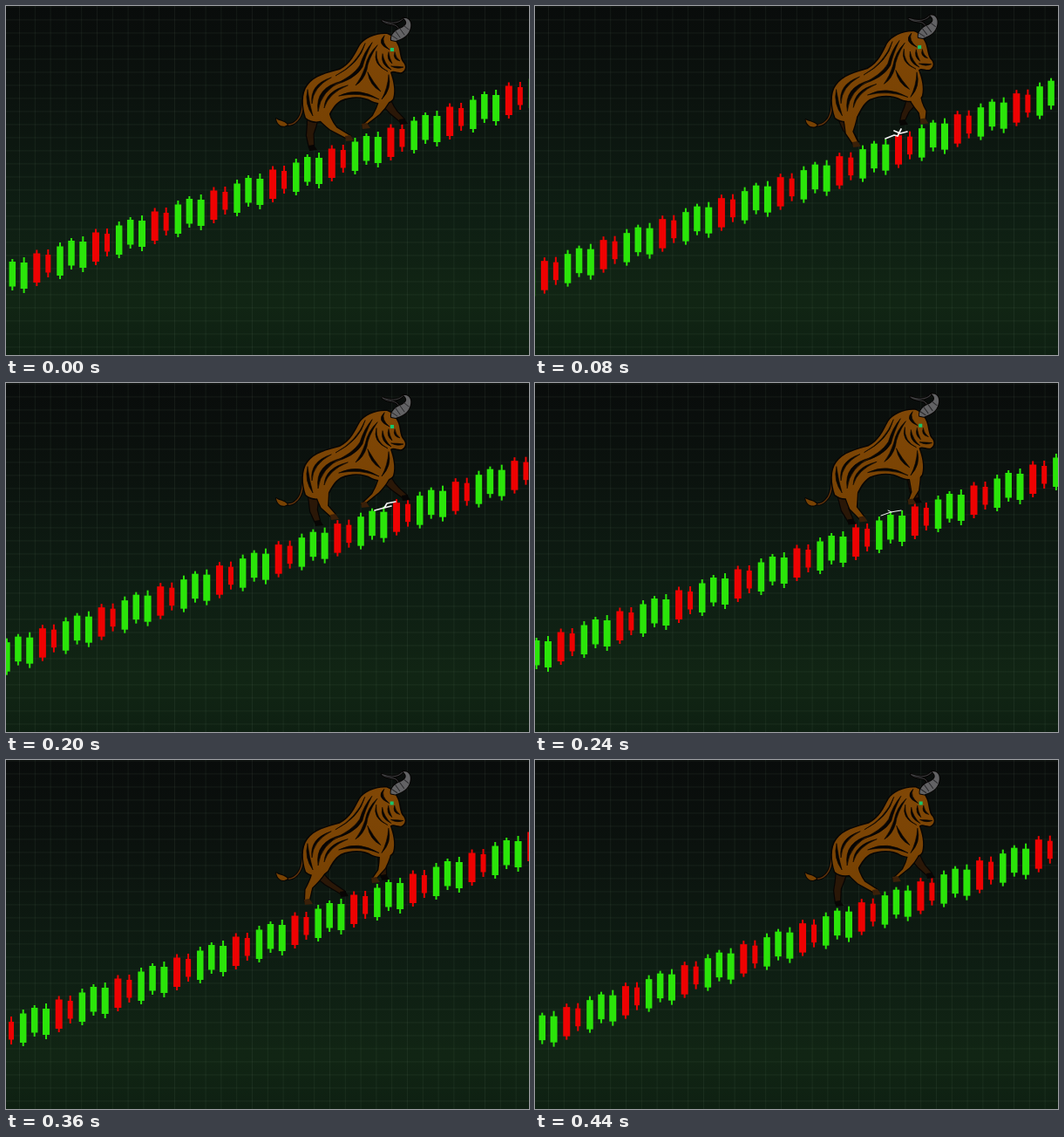
These frames come from a looping animation (600 by 400 pixels, 0.48 s). An HTML page with a canvas:

```html
<!DOCTYPE html>
<html lang="en">
<head>
<meta charset="utf-8">
<title>Bull run</title>
<style>
html, body { margin: 0; width: 100%; height: 100%; overflow: hidden; background: #0b120e; }
canvas { display: block; }
</style>
</head>
<body>
<canvas id="stage" width="600" height="400"></canvas>
<script>
const ctx = document.getElementById('stage').getContext('2d');
const STEP = 40, STEPS = 12;
const GREEN = '#2be50a', RED = '#ee0202', INK = '#070504', HIDE = '#784203';

// x, width, wick top, body top, body bottom, wick bottom, colour
const candles = [
  [62, 7.5, 271, 275.5, 309, 313, GREEN],
  [75, 7.5, 266, 269, 297.5, 302, GREEN],
  [88.3, 8, 264, 270, 300, 305, GREEN],
  [103, 8, 255.5, 259.5, 293, 297, RED],
  [116, 6, 255, 261, 281.5, 287, RED]
];

// step, body angle, tail drop, then the feet: near hind, far hind, near front, far front
const poses = [
  [0, 0, 0, 394, 154, 352, 165, 413, 140, 456, 135],
  [1, -.06, 0, 382, 158, 343, 159, 467, 129, 430, 138],
  [3, 0, 0, 356, 164, 392, 153, 426, 140, 416, 134],
  [5, 0, 3, 377, 156, 359, 163, 412, 142, 459, 134],
  [7, -.025, 2, 376, 161, 368, 160, 453, 135, 419, 140],
  [9, -.005, 0, 347, 165, 388, 156, 424, 140, 435, 137],
  [11, -.005, 0, 392, 154, 349, 167, 415, 139, 454, 135]
];

const body = new Path2D('M437 32C425 31 411 37 406 45C400 56 396 66 383 73C368 77 354 80 346 91C339 100 340 116 344 128C351 134 362 134 369 127C373 120 376 113 384 108C396 103 410 103 420 109C429 113 441 112 444 106C447 96 444 85 441 76C445 73 449 77 454 76C459 73 459 68 455 64C452 60 452 52 450 46C447 39 443 34 437 32Z');
const horn = new Path2D('M442 39C441 33 447 27 454 25C460 22 461 18 456 14C464 13 466 21 463 28C460 36 452 38 447 40Z');
const farHorn = new Path2D('M456 14C450 21 440 20 432 17M432 17C438 23 448 18 451 27');
const ridges = new Path2D('M443 34l6 4M447 29l5 7M452 26l5 7M457 23l5 4');
const stripes = new Path2D(
  'M412 43Q406 66 378 80Q402 67 412 43' +
  'M420 42Q412 58 409 70Q400 85 374 91Q398 81 406 68Q411 52 420 42' +
  'M426 45Q415 62 414 73Q410 86 401 91Q408 82 412 70Q415 55 426 45' +
  'M425 52Q420 67 438 75Q424 68 425 52' +
  'M432 55Q429 67 442 73Q434 66 432 55' +
  'M373 82Q348 90 351 112Q352 93 373 82' +
  'M386 86Q354 93 358 121Q361 97 386 86' +
  'M392 91Q366 97 365 117Q370 100 392 91' +
  'M346 96Q342 112 352 126Q348 112 346 96' +
  'M382 103Q404 92 428 107Q406 98 382 103' +
  'M439 79Q443 95 431 107Q438 94 439 79' +
  'M434 34Q424 43 440 50Q430 42 434 34' +
  'M415 76Q417 91 430 98Q421 87 415 76' +
  'M442 69Q449 73 456 70Q449 69 442 69' +
  'M446 53Q443 61 452 63Q447 59 446 53' +
  'M439 53Q436 61 443 66Q440 60 439 53');
const tail = new Path2D('M342 100C340 113 341 125 333 132C328 137 322 137 316 134');
const tuft = new Path2D('M310 129C313 132 319 131 323 136C318 140 311 137 310 129Z');

const slash = new Path2D('M393 153C403 151 412 149 416 145L424 142L427 137L430 139L437 140L428 144L423 147L417 148C409 151 402 152 393 153Z');
const sparks = [
  new Path2D('M402 152L412 148L416 149M412 143L419 146L427 144M416 149L420 141'),
  new Path2D('M423 146L434 143L437 138L447 136M434 143L442 141'),
  new Path2D('M397 152L408 148L420 146M405 146L409 148')
];

function poseAt(step) {
  const next = poses.findIndex(p => p[0] >= step);
  const b = poses[next], a = poses[Math.max(0, next - 1)];
  const k = a === b ? 0 : (step - a[0]) / (b[0] - a[0]);
  return a.map((v, i) => v + (b[i] - v) * k);
}

function outline(path, color, width) {
  ctx.strokeStyle = color;
  ctx.lineWidth = width;
  ctx.stroke(path);
}

function paint(path, color) {
  ctx.fillStyle = color;
  ctx.fill(path);
}

function drawBackground() {
  const shade = ctx.createLinearGradient(0, 0, 0, 400);
  [[0, '#090c0b'], [.25, '#0b120e'], [.6, '#0e1e13'], [.85, '#112514'], [1, '#0e2012']]
    .forEach(([at, color]) => shade.addColorStop(at, color));
  ctx.fillStyle = shade;
  ctx.fillRect(0, 0, 600, 400);
  ctx.fillStyle = 'rgba(150,175,150,.085)';
  for (let x = 15; x < 600; x += 17.8) ctx.fillRect(x, 0, 1, 400);
  for (let y = .4; y < 400; y += 15) ctx.fillRect(0, y, 600, 1);
}

function drawCandles(step) {
  for (let i = -2; i < 11; i++) {
    const dx = i * 67.69 - step * 12.22;
    ctx.save();
    ctx.translate(dx, -dx * 24 / 67.69);
    for (const [x, w, high, top, bottom, low, color] of candles) {
      ctx.fillStyle = color;
      ctx.fillRect(x - w / 2, top, w, bottom - top);
      ctx.fillRect(x - 1, high, 2, low - high);
    }
    ctx.restore();
  }
}

// A limb that narrows from hip to knee, then runs slim to the hoof
function limb(hx, hy, fx, fy, wide, bend) {
  const kx = hx + (fx - hx) * .6 + bend, ky = hy + (fy - hy) * .65;
  const leg = new Path2D(), hoof = new Path2D();
  leg.moveTo(hx - wide, hy);
  leg.quadraticCurveTo(hx - wide * .7, hy + 10, kx - 4, ky);
  leg.lineTo(fx - 4, fy - 3);
  leg.lineTo(fx + 1, fy - 5);
  leg.lineTo(kx + 3.5, ky - 2);
  leg.quadraticCurveTo(hx + wide, hy + 10, hx + wide, hy);
  leg.closePath();
  hoof.moveTo(fx - 5, fy - 5);
  hoof.lineTo(fx + 1, fy - 6);
  hoof.lineTo(fx + 5, fy);
  hoof.lineTo(fx - 4, fy + 1);
  hoof.closePath();
  return { leg, hoof };
}

function drawBull(step) {
  const [, angle, drop, ...feet] = poseAt(step);
  const hind = limb(361, 118, feet[0], feet[1], 9, -5);
  const farHind = limb(352, 118, feet[2], feet[3], 7, -3);
  const front = limb(435, 100, feet[4], feet[5], 7, 3);
  const farFront = limb(433, 100, feet[6], feet[7], 7, -2);
  const turned = draw => {
    ctx.save();
    ctx.translate(345, 110);
    ctx.rotate(angle);
    ctx.translate(-345, -110);
    draw();
    ctx.restore();
  };

  for (const { leg, hoof } of [farHind, farFront]) {
    outline(leg, INK, 2.4);
    paint(leg, '#2a1707');
    paint(hoof, INK);
  }
  turned(() => {
    ctx.translate(0, drop);
    outline(tail, INK, 3.4);
    outline(tail, '#5e330b', 1.4);
    outline(tuft, INK, 2);
    paint(tuft, HIDE);
    ctx.translate(0, -drop);
    outline(body, INK, 3);
  });
  for (const { leg, hoof } of [hind, front]) {
    outline(leg, INK, 2.6);
    paint(leg, HIDE);
    paint(hoof, '#3a2009');
  }
  turned(() => {
    const hide = ctx.createLinearGradient(0, 32, 0, 132);
    hide.addColorStop(0, '#804706');
    hide.addColorStop(1, HIDE);
    paint(body, hide);
    paint(stripes, INK);
    outline(stripes, INK, .6);
    outline(farHorn, INK, 3);
    outline(farHorn, '#3c3c3e', 1);
    outline(horn, INK, 2);
    paint(horn, '#626264');
    outline(ridges, '#29292b', 1);
    ctx.fillStyle = '#18c66c';
    ctx.fillRect(441, 48, 4, 4);
  });
}

function drawSpark(step) {
  if (step === 1) paint(slash, '#fff');
  else if (step > 1 && step < 8) outline(sparks[Math.floor(step / 2) - 1], '#f4f4f4', step > 5 ? 1 : 1.7);
}

function frame(now) {
  const step = Math.floor(now / STEP) % STEPS;
  drawBackground();
  drawCandles(step);
  drawBull(step);
  drawSpark(step);
  requestAnimationFrame(frame);
}

ctx.lineJoin = 'round';
ctx.lineCap = 'round';
frame(0);
</script>
</body>
</html>
```
